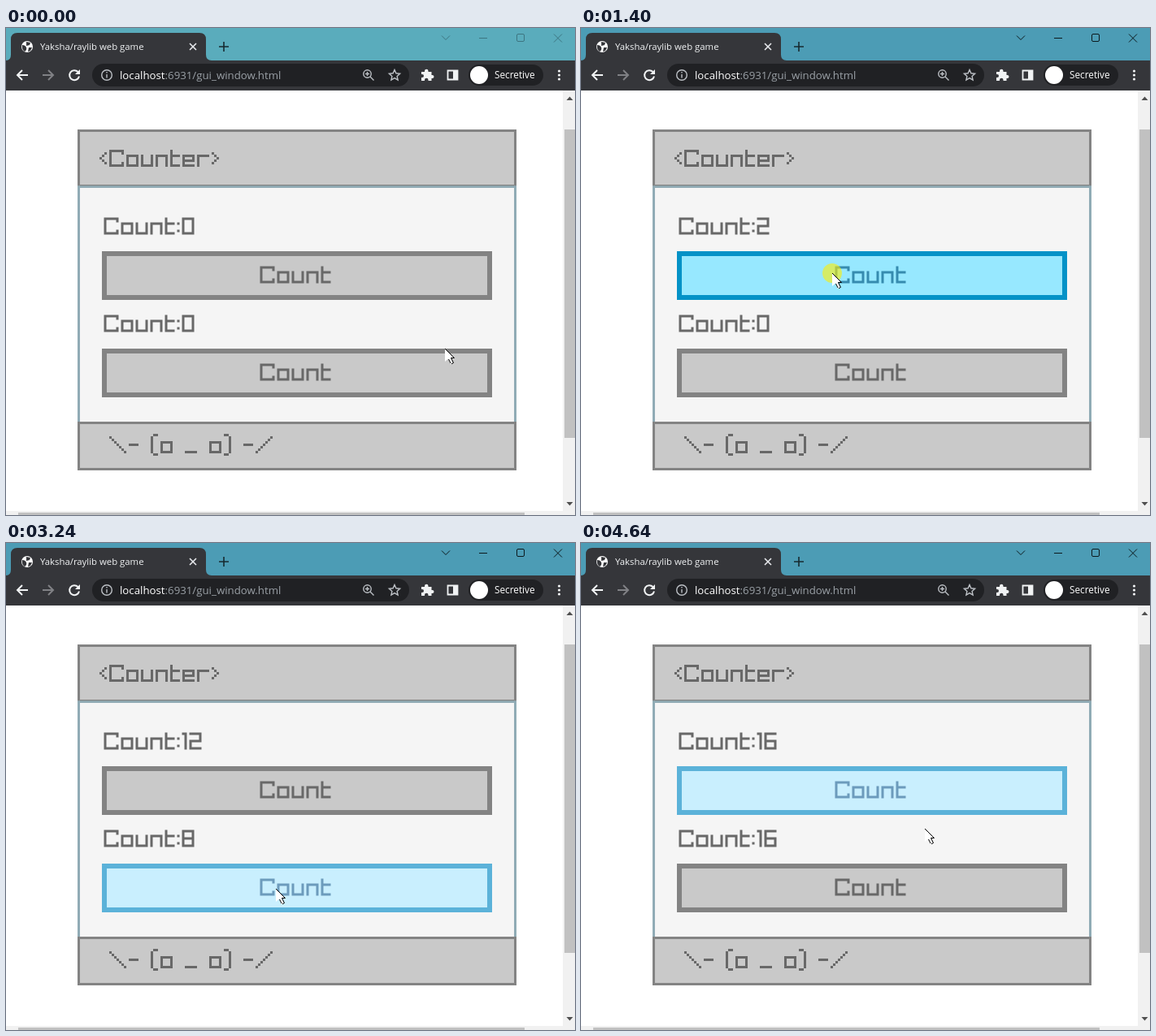
An HTML page for the animation above (4680 ms loop, 700 by 600 pixels).

```html
<!DOCTYPE html>
<html lang="en">
<head>
<meta charset="utf-8">
<title>Counter demo</title>
<style>
  html, body { margin: 0; width: 100%; height: 100%; overflow: hidden; background: #fff; }
  svg { display: block; width: 700px; height: 600px; }
  text { font-family: "Open Sans", "Noto Sans", sans-serif; }
  .line { fill: none; stroke-width: 1.6; }
  .pixels { fill: none; stroke-width: 1; stroke-linecap: square; }
  #panel { filter: blur(.6px); }
</style>
</head>
<body>
<svg viewBox="0 0 700 600">
  <rect width="700" height="600" fill="#fff"/>

  <!-- Title bar and tab -->
  <rect id="titlebar" width="700" height="41"/>
  <path d="M0 40q6 0 6-7V14q0-8 8-8H238q8 0 8 8V33q0 7 7 7z" fill="#35363a"/>
  <circle cx="26" cy="23" r="7" fill="#fff"/>
  <path d="M20 21q4 0 5 3t-2 5q-4-3-3-8zM25 17l5 1-1 3-4 1zM28 24l4 0-2 4-3 1z" fill="#35363a"/>
  <text x="42" y="27" font-size="11.35" fill="#f1f3f4">Yaksha/raylib web game</text>
  <path class="line" d="M226 19l8 8m0-8l-8 8" stroke="#e8eaed"/>
  <path class="line" d="M262 23h12m-6-6v12" stroke="#172a30"/>
  <path id="controls" class="line" style="stroke-width:1" d="M536 9.5l5 5 5-5M582 12.5h10M630 7.5h6q1.500 0 1.500 1.500v6q0 1.500-1.500 1.500h-6q-1.500 0-1.500-1.500v-6q0-1.500 1.500-1.500zM674 7.500l10 10m0-10l-10 10"/>

  <!-- Toolbar -->
  <rect y="40" width="700" height="37" fill="#35363a"/>
  <rect x="106" y="44" width="390" height="28" rx="14" fill="#202124"/>
  <g class="line" stroke="#f1f3f4">
    <path d="M27 58H14m6-6l-6 6 6 6" stroke-width="2"/>
    <path d="M45 58H58m-6-6l6 6-6 6" stroke="#808185" stroke-width="2"/>
    <path d="M88.500 54A6 6 0 1 0 90 59.500" stroke-width="2"/>
    <path d="M91 51v6h-6z" fill="#f1f3f4" stroke="none"/>
    <g stroke="#bdc1c6" stroke-width="1.400">
      <circle cx="124" cy="58" r="6.300"/>
      <path d="M124 57v4.500m0-7.500v1.500"/>
      <circle cx="444.500" cy="56.500" r="4.700"/>
      <path d="M448 60l4.500 4.500M442 56.500h5m-2.500-2.500v5"/>
      <path d="M478 51.500l1.900 4.300 4.700.5-3.500 3.100 1 4.600-4.100-2.400-4.100 2.400 1-4.600-3.500-3.100 4.700-.5z"/>
    </g>
    <path d="M543.500 52.500h12v11h-12z" stroke-width="1.800"/>
  </g>
  <g fill="#f1f3f4">
    <path d="M511 54h4v-1a2 2 0 0 1 4.500 0v1h4v4h1a2 2 0 0 1 0 4h-1v3h-4v-1a2 2 0 0 0-4.500 0v1h-4v-4h1a2 2 0 0 0 0-4h-1z"/>
    <path d="M550 52h6v12h-6z"/>
    <circle cx="680.500" cy="53" r="1.600"/><circle cx="680.500" cy="58" r="1.600"/><circle cx="680.500" cy="63" r="1.600"/>
  </g>
  <text x="140" y="63" font-size="13.25" fill="#9aa0a6"><tspan fill="#fff">localhost</tspan>:6931/gui_window.html</text>
  <rect x="569" y="45" width="92" height="26" rx="13" fill="#202124"/>
  <circle cx="582" cy="58" r="11" fill="#fff"/>
  <text x="601" y="62" font-size="11.8" fill="#fff">Secretive</text>

  <!-- Scrollbars -->
  <path d="M685 77h15v523H0v-5h685z" fill="#f1f1f1"/>
  <path d="M687 125h13v380h-13zM15 597h623v3H15z" fill="#c1c1c1"/>
  <path d="M689.500 89l4-4.500 4 4.500zM689.500 584l4 4.500 4-4.500z" fill="#505050"/>

  <!-- Counter window -->
  <g id="panel">
    <path d="M89.500 195.500h537v291h-537z" fill="#f5f5f5" stroke="#90abb5" stroke-width="3"/>
    <path d="M89.500 126.500h537v68h-537zM89.500 486.500h537v57h-537z" fill="#c9c9c9" stroke="#838383" stroke-width="3"/>
    <path d="M88 195.500h540" stroke="#90abb5" stroke-width="2.600"/>
  </g>

  <circle id="halo" r="12" fill="#ffee00" opacity=".6"/>
  <g id="cursor">
    <path d="M0 0V16l4-3.500 3 6.500 3-1.500-3-6H11.500z" fill="#fff"/>
    <path d="M0 0L11.500 11.500H7.500l3 6-2.500 1.300M4.500 13l2.500 5" fill="none" stroke="#000" stroke-width="1"/>
  </g>
</svg>

<script>
const LOOP = 4680, TICK = 40, CLICK = 90;
const $ = id => document.getElementById(id);

function add(parent, tag, attrs) {
  const el = document.createElementNS("http://www.w3.org/2000/svg", tag);
  for (const key in attrs) el.setAttribute(key, attrs[key]);
  return parent.appendChild(el);
}

// Bitmap lettering: each glyph is a width and strokes through pixel centres.
const diagonal = (x, y, dx, count) =>
  Array.from({ length: count }, (_, i) => `M${x + dx * i} ${y + i}h.01`).join("");

const GLYPHS = {
  " ": [3, ""],
  C: [6, "M5 2V1H0V7H5V6"],
  o: [5, "M0 3h4v4h-4z"],
  u: [5, "M0 3v4h4v-4"],
  n: [5, "M0 7v-4h4v4"],
  t: [4, "M0 1v6h3M0 3h3"],
  e: [5, "M4 7h-4v-4h4v2h-4"],
  r: [5, "M0 7v-4h4"],
  ":": [1, "M0 3h.01M0 6h.01"],
  "<": [3, diagonal(2, 2, -1, 3) + diagonal(1, 5, 1, 2)],
  ">": [3, diagonal(0, 2, 1, 3) + diagonal(1, 5, -1, 2)],
  "\\": [7, diagonal(0, 1, 1, 7)],
  "/": [7, diagonal(6, 1, -1, 7)],
  "-": [4, "M0 4h3"],
  "_": [5, "M0 7h4"],
  "(": [3, "M1 0h1M0 1v6M1 8h1"],
  ")": [3, "M0 0h1M2 1v6M0 8h1"],
  0: [5, "M0 1h4v6h-4z"],
  1: [2, "M0 1h1v6"],
  2: [5, "M0 1h4v3h-4v3h4"],
  3: [5, "M0 1h4v6h-4M1 4h3"],
  4: [5, "M0 1v3h4M4 1v6"],
  5: [5, "M4 1h-4v3h4v3h-4"],
  6: [5, "M4 1h-4v6h4v-3h-4"],
  7: [5, "M0 1h4v6"],
  8: [5, "M0 1h4v6h-4zM0 4h4"],
  9: [5, "M4 4h-4v-3h4v6h-4"]
};

function pixelText(x, y, string = "") {
  const group = add($("panel"), "g", {
    class: "pixels", stroke: "#686868",
    transform: `translate(${x + 1.5} ${y + 1.5}) scale(3)`
  });
  const label = {
    group,
    set(value) {
      if (value === label.value) return;
      label.value = value;
      group.replaceChildren();
      let left = 0;
      for (const char of value) {
        const [width, d] = GLYPHS[char];
        add(group, "path", { d, transform: `translate(${left})` });
        left += width + 1;
      }
    }
  };
  label.set(string);
  return label;
}

const STYLES = {
  normal: ["#838383", "#c9c9c9", "#686868"],
  hover: ["#5bb2d9", "#c9effe", "#6c9bbc"],
  press: ["#0492c7", "#97e8ff", "#368baf"]
};

function makeCounter(top) {
  const label = pixelText(120.5, top - 44.500);
  const box = add($("panel"), "rect", { x: 121, y: top + 3, width: 474, height: 54, "stroke-width": 6 });
  const caption = pixelText(312.5, top + 15.5, "Count");
  return {
    contains: ([x, y]) => x > 118 && x < 598 && y > top + 1 && y < top + 60,
    show(count, style) {
      const [border, base, ink] = STYLES[style];
      label.set("Count:" + count);
      box.setAttribute("stroke", border);
      box.setAttribute("fill", base);
      caption.group.setAttribute("stroke", ink);
    }
  };
}

pixelText(115, 147, "<Counter>");
const counters = [makeCounter(275), makeCounter(395)];
const face = pixelText(127, 500);

// Cursor stops: time, x, y.
const STOPS = [
  [0, 540, 395], [80, 540, 395], [520, 59, 163], [640, 59, 163],
  [880, 296, 289], [960, 296, 289], [1200, 310, 302], [1400, 309, 302],
  [1480, 309, 302], [2120, 304, 302], [2300, 304, 302], [2430, 337, 429],
  [2640, 337, 429], [3900, 327, 423], [4060, 327, 423], [4180, 310, 302],
  [4550, 310, 302], [4640, 423, 352], [LOOP, 423, 352]
];

const BURSTS = [
  { target: 0, start: 1220, clicks: 12 },
  { target: 1, start: 2465, clicks: 16 },
  { target: 0, start: 4180, clicks: 4 }
];

function cursorAt(t) {
  const i = STOPS.findIndex(stop => stop[0] > t);
  const [t0, x0, y0] = STOPS[i - 1], [t1, x1, y1] = STOPS[i];
  const p = (t - t0) / (t1 - t0), eased = p * p * (3 - 2 * p);
  return [x0 + (x1 - x0) * eased, y0 + (y1 - y0) * eased];
}

function render(time) {
  const t = Math.floor(time % LOOP / TICK) * TICK;
  const cursor = cursorAt(t);
  const counts = [0, 0];
  let pressed = -1;

  for (const { target, start, clicks } of BURSTS) {
    const progress = (t - start) / CLICK;
    if (progress < 0) continue;
    counts[target] += Math.min(clicks, Math.floor(progress));
    if (progress < clicks && progress % 1 < .6) pressed = target;
  }

  counters.forEach((counter, i) => {
    const hovered = counter.contains(cursor) || (i === 0 && t >= 4160);
    counter.show(counts[i], pressed === i ? "press" : hovered ? "hover" : "normal");
  });

  const eye = (counts[0] + counts[1]) % 3 === 1 ? "-" : "o";
  face.set(`\\- (${eye} _ ${eye}) -/`);

  const focused = t >= 520;
  $("titlebar").setAttribute("fill", focused ? "#4c9cb5" : "#5aacbc");
  $("controls").setAttribute("stroke", focused ? "#0c191d" : "#3d7581");

  const place = `translate(${cursor.map(Math.round).join(" ")})`;
  $("cursor").setAttribute("transform", place);
  $("halo").setAttribute("transform", place);
  const focusClick = t >= 520 && t < 640;
  $("halo").setAttribute("visibility", pressed >= 0 || focusClick ? "visible" : "hidden");
}

const begin = performance.now();
function loop() {
  render(performance.now() - begin);
  requestAnimationFrame(loop);
}
loop();
</script>
</body>
</html>
```
